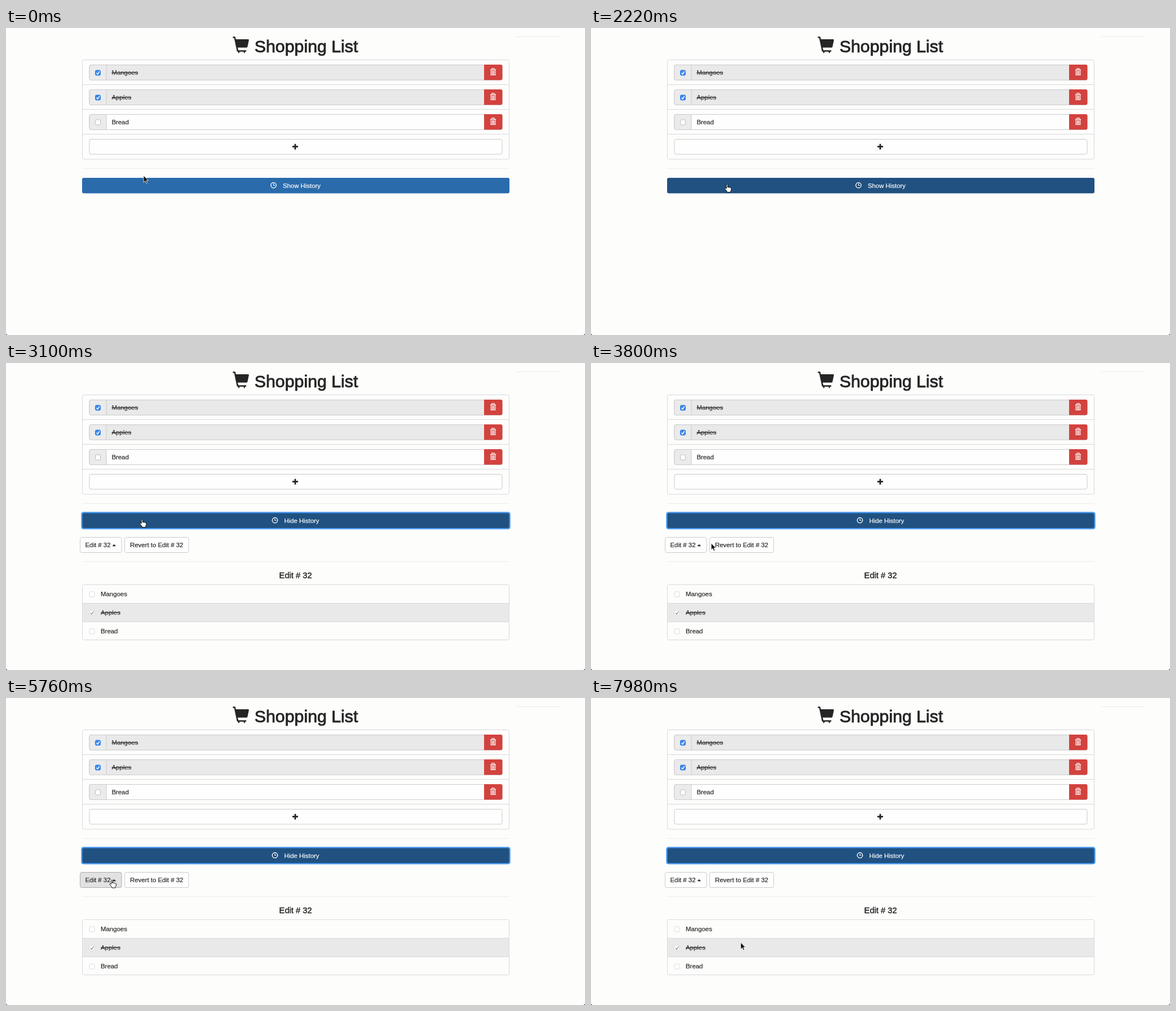
These frames come from a looping animation (1027 px wide and 545 px high, 8 s). An HTML page:

```html
<!DOCTYPE html>
<html>
<head>
<meta charset="utf-8">
<title>Shopping List</title>
<style>
  html, body { margin: 0; width: 100%; height: 100%; overflow: hidden; background: #fdfdfc; }
  svg { display: block; width: 100%; height: 100%; }
  text { font: 11.4px "Liberation Sans", Arial, sans-serif; fill: #252525; stroke: #252525; stroke-width: .2; }
  .mid { text-anchor: middle; }
  .light { fill: #fff; stroke: #fff; }
  .done { text-decoration: line-through; stroke: none; }
  .h1 { font-size: 30.3px; stroke-width: .9; }
  .h4 { font-size: 14.7px; stroke-width: .45; }
  .line { fill: none; stroke: #d9d9df; }
  .rule { stroke: #ededea; }
  .btn { fill: #fefefe; stroke: #cbcbc8; }
  .icon { fill: none; stroke: #fff; stroke-width: 1.1; }
</style>
</head>
<body>
<svg id="stage" viewBox="0 0 1027 545"></svg>
<script>
const LOOP = 8000, OPEN_AT = 2600;
const stage = document.getElementById('stage');

const box = (x, y, w, h, attrs, r = 3) =>
  `<rect x="${x}" y="${y}" width="${w}" height="${h}" rx="${r}" ${attrs}/>`;
const path = (d, attrs) => `<path d="${d}" ${attrs}/>`;
const label = (x, y, str, cls = '', id = '') => `<text id="${id}" x="${x}" y="${y}" class="${cls}">${str}</text>`;

function checkbox(x, y, on, disabled) {
  const blue = on && !disabled;
  const paint = blue ? 'fill="#3989f0" stroke="#2f7bdf"'
    : `fill="#fff" stroke="${disabled ? '#dadade' : '#bebebe'}"`;
  const tick = path(`M${x + 2} ${y + 4.8}l2 2.2 3.4-5`,
    `fill="none" stroke="${blue ? '#fff' : '#777'}" stroke-width="${blue ? 1.4 : 1.1}"`);
  return box(x, y, 9, 9, paint, 2) + (on ? tick : '');
}

function trash(x, y) {
  return `<g class="icon" transform="translate(${x} ${y})">` +
    path('M-5 -3.6H5M-2 -4V-6H2V-4M-3.9 -3V5.7H3.9V-3M-1.7 -2V4.5M0 -2V4.5M1.7 -2V4.5', '') + '</g>';
}

function itemRow(name, y, done) {
  return box(148, y, 732, 27, `fill="${done ? '#e9e9e9' : '#fefefe'}" stroke="#cbcbcf"`) +
    path(`M178 ${y}H151a3 3 0 0 0-3 3v21a3 3 0 0 0 3 3H178Z`, 'fill="#ebebeb" stroke="#cbcbcf"') +
    checkbox(158.5, y + 9.5, done) +
    label(187.4, y + 17.4, name, done ? 'done' : '') +
    path(`M848 ${y - .5}h29.5a3 3 0 0 1 3 3v21.5a3 3 0 0 1-3 3h-29.5Z`, 'fill="#d2423e"') +
    trash(864, y + 12.2);
}

function historyRow(name, y, done) {
  return (done ? box(136, y, 756, 32.5, 'fill="#e9e9e9"', 0) : '') +
    checkbox(148, y + 12.5, done, true) +
    label(168, y + 20.2, name, done ? 'done' : '');
}

const cart = path('M56 1200h94q17 0 31-11t18-27l38-162h896q24 0 39-18.5t10-42.5l-100-475q-5-21-27-42.5t-55-21.5h-633' +
  'l48-200h535a50 50 0 0 0 0-100h-50v-50a50 50 0 0 0-100 0v50h-300v-50a50 50 0 0 0-100 0v50h-31q-18 0-32.5 10t-20.5 19' +
  'l-5 10-201 961h-54a50 50 0 0 0 0 100z', 'fill="#252525" transform="translate(402 44.5) scale(.0244 -.0244)"');

const list = cart + label(440.8, 43.3, 'Shopping List', 'h1') +
  box(135.5, 56.5, 757, 176.5, 'class="line"') +
  path('M136 100.5H892M136 144.5H892M136 188.5H892', 'class="line"') +
  itemRow('Mangoes', 65.5, true) + itemRow('Apples', 109.5, true) + itemRow('Bread', 153.5, false) +
  box(148, 197.5, 732, 26.5, 'class="btn"') +
  path('M508 210.7h10M513 205.7v10', 'stroke="#252525" stroke-width="2.8"') +
  path('M135 249.5H893', 'class="rule"') +
  path('M905 15.5H983', 'stroke="#eeeee2"') +
  path('M0 542.5V545H3Q.5 544.5 0 542.5ZM1027 542.5V545H1024Q1026.5 544.5 1027 542.5Z', 'fill="#333"');

const toggle = box(135, 266, 758, 27.5, 'id="bar"') +
  '<g id="glow" fill="none">' + box(134, 265, 760, 29.5, 'stroke="#a9d0fb" stroke-width="2"', 4) +
  box(134.5, 265.5, 759, 28.5, 'stroke="#4a9bf3" stroke-width="2"') + '</g>' +
  '<g id="clock" class="icon"><circle cx="474.5" cy="279.2" r="4.7" stroke-width="1.4"/>' +
  path('M474.5 276.2V279.5H477', '') + '</g>' +
  label(524.5, 283.7, '', 'mid light', 'caption');

const history = '<g id="history">' +
  box(131.5, 309.5, 73.5, 27, 'id="edit" class="btn"') + label(140.5, 327.2, 'Edit # 32') +
  path('M188.4 325.2h6.8l-3.4-3.4Z', 'fill="#252525"') +
  box(210.5, 309.5, 113.5, 27, 'class="btn"') + label(220, 327.2, 'Revert to Edit # 32') +
  path('M135 352.5H893', 'class="rule"') +
  label(513.6, 382.3, 'Edit # 32', 'mid h4') +
  historyRow('Mangoes', 393.5, false) + historyRow('Apples', 426.5, true) + historyRow('Bread', 459.5, false) +
  box(135.5, 393.5, 757, 98, 'class="line"') +
  path('M136 426.5H892M136 459.5H892', 'class="line"') + '</g>';

const cursor = '<g id="cursor">' +
  path('M0 0V12L2.8 9.5L4.7 13.7L6.7 12.8L4.9 8.7H8.6Z', 'id="arrow" fill="#111" stroke="#fff" stroke-width=".8"') +
  path('M-1.8 6.5V.5Q-1.7-1-.6-1T.6.5V4.4Q2-.2 0 4.2Q2.2 3 2.8 4.7Q4.5 3.6 5 5.2Q7 4.6 7 6.8Q7 9.6 5.6 11.3V13H-.6V11.8L-4.3 7.2Q-4.6 5.4-3 5.6Z',
    'id="hand" fill="#fff" stroke="#151515"') + '</g>';

stage.innerHTML = list + toggle + history + cursor;
const part = id => document.getElementById(id);
const show = (id, on) => part(id).setAttribute('visibility', on ? 'visible' : 'hidden');

// Pointer hotspot: time, x, y
const stops = [
  [0, 244, 262], [150, 244, 262], [800, 242, 278.5], [3300, 242, 278.5],
  [4300, 184.5, 361], [4700, 184.5, 361], [5400, 188.5, 324], [6500, 188.5, 324],
  [7160, 197.5, 350], [7350, 199, 352], [7960, 265.5, 434], [LOOP, 265.5, 434]
];

function pointerAt(t) {
  const i = stops.findIndex(s => s[0] > t);
  const [t0, x0, y0] = stops[i - 1], [t1, x1, y1] = stops[i];
  const p = (t - t0) / (t1 - t0), k = p * p * (3 - 2 * p);
  return [x0 + (x1 - x0) * k, y0 + (y1 - y0) * k];
}

function draw(t) {
  const open = t >= OPEN_AT;
  const [x, y] = pointerAt(t);
  const onBar = y > 266 && y < 294;
  const onEdit = open && y > 309 && y < 337 && x < 205;

  show('glow', open);
  show('history', open);
  show('arrow', !onBar && !onEdit);
  show('hand', onBar || onEdit);
  part('bar').setAttribute('fill', open || onBar ? '#205180' : '#2a6bac');
  part('caption').textContent = open ? 'Hide History' : 'Show History';
  part('clock').setAttribute('transform', `translate(${open ? 2.5 : 0} 0)`);
  part('edit').style.fill = onEdit ? '#e2e2e2' : '';
  part('edit').style.stroke = onEdit ? '#adadad' : '';
  part('cursor').setAttribute('transform', `translate(${x} ${y})`);
}

const start = performance.now();
function tick() {
  draw((performance.now() - start) % LOOP);
  requestAnimationFrame(tick);
}
tick();
</script>
</body>
</html>
```
